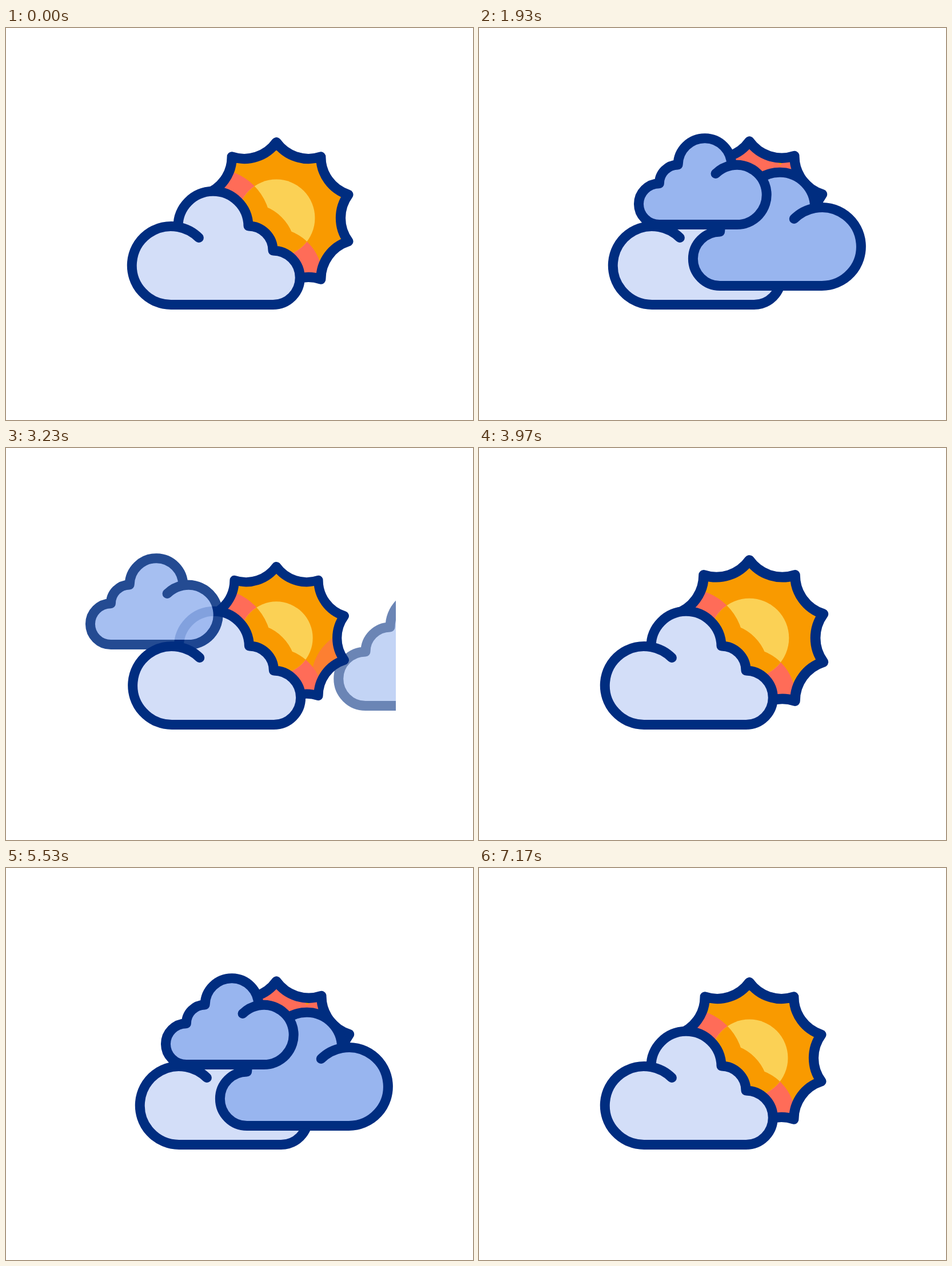
An HTML page for the animation above (7.21 s loop, 817 by 685 pixels).

```html
<!DOCTYPE html>
<html lang="en">
<head>
<meta charset="utf-8">
<title>Sun and clouds</title>
<style>
  html, body { margin: 0; width: 100%; height: 100%; overflow: hidden; background: #fff; }
  svg { display: block; width: 817px; height: 685px; }
  .line { stroke: #002d80; stroke-width: 17; stroke-linejoin: round; stroke-linecap: round; }
  .shade { stroke-width: 79; stroke-linejoin: round; stroke-linecap: round; }
  .red { fill: #ff6c58; stroke: #ff6c58; }
  .orange { fill: #f99a00; stroke: #f99a00; }
</style>
</head>
<body>
<svg viewBox="0 0 817 685">
  <defs>
    <path id="cloud" vector-effect="non-scaling-stroke" d="M289 483.5A68.5 68.5 0 1 1 301 347.6A61.5 61.5 0 0 1 424 346A43 43 0 0 1 467 389A47.25 47.25 0 0 1 467 483.5ZM301 347.6A68.5 68.5 0 0 1 337.4 366.6"/>
    <clipPath id="inStar"><path class="star sun"/></clipPath>
    <clipPath id="inDisc"><circle class="sun" r="66.5"/></clipPath>
    <clipPath id="window"><rect x="135" width="547" height="685"/></clipPath>
  </defs>
  <path class="star sun" fill="#f99a00"/>
  <g class="shade red" clip-path="url(#inStar)">
    <use href="#cloud" class="front"/><use href="#cloud" class="bigShade"/><use href="#cloud" class="small"/>
  </g>
  <circle class="sun" r="66.5" fill="#fbd155"/>
  <g class="shade orange" clip-path="url(#inDisc)">
    <use href="#cloud" class="front"/><use href="#cloud" class="bigShade"/><use href="#cloud" class="small"/>
  </g>
  <path class="star sun line" fill="none"/>
  <g class="line" clip-path="url(#window)">
    <use href="#cloud" class="front" fill="#d3def8"/>
    <use href="#cloud" class="big body"/>
    <use href="#cloud" class="small body"/>
  </g>
</svg>
<script>
const LOOP = 7210, STEP = 100 / 3, CYCLE = 108, TURN = 2 * Math.PI;

// 0 before a, 1 after b, half a cosine between
function ease(step, a, b) {
  const p = Math.min(1, Math.max(0, (step - a) / (b - a)));
  return (1 - Math.cos(Math.PI * p)) / 2;
}

// four pulses per cycle whose pace drifts a little
function sunRadius(step) {
  const t = step / 107;
  const drift = 0.22 * Math.cos(TURN * (t - 0.42)) - 0.06 * Math.sin(2 * TURN * t) - 0.065;
  return 141.5 + 10.5 * Math.cos(TURN * (4 * t + drift));
}

function setAll(selector, attrs) {
  for (const el of document.querySelectorAll(selector))
    for (const key in attrs) el.setAttribute(key, attrs[key]);
}

function starPath(points, radius, bend) {
  let d = '';
  for (let i = 0; i <= points; i++) {
    const a = i * TURN / points;
    d += (i ? `A${bend} ${bend} 0 0 0 ` : 'M') +
      `${(radius * Math.sin(a)).toFixed(2)} ${(-radius * Math.cos(a)).toFixed(2)}`;
  }
  return d + 'Z';
}

function placeCloud(name, transform, opacity) {
  setAll('.' + name, { transform, opacity });
  // a faint cloud keeps its outline but not its tint
  setAll(`.${name}.body`, { fill: opacity < 0.45 ? '#fff' : '#98b5ef' });
}

function draw(time) {
  const step = Math.min(215, Math.floor((time % LOOP + 4) / STEP)) % CYCLE;
  const go = (a, b) => ease(step, a, b);

  const front = 212 - 37 * go(12, 31) + 51 * go(31, 56) - 14 * go(58, 107);
  const big = 592 - 226 * go(23, 53) - 15 * go(57, 67) + 444 * go(87, 107);
  const small = 55 + 216 * go(24, 43.5) - 264 * go(87, 107);
  const bigAlpha = go(22, 33.5) - go(92.5, 102.5);
  const smallAlpha = go(24.5, 35.5) - go(94.5, 104.5);
  const mirrorBig = left => `translate(${left + 523} -33) scale(-1 1)`;

  setAll('.sun', { transform: `translate(473 332) scale(${sunRadius(step) / 139})` });
  placeCloud('front', `translate(${front - 212} 0)`, 1);
  placeCloud('big', mirrorBig(big), bigAlpha);
  // the shadow trails its cloud
  placeCloud('bigShade', mirrorBig(0.63 * big + 204), bigAlpha);
  placeCloud('small', `translate(${small + 399.8} -24.4) scale(-.761 .761)`, smallAlpha);
}

setAll('.star', { d: starPath(10, 130.5, 68) });
const start = performance.now();
function tick() {
  draw(performance.now() - start);
  requestAnimationFrame(tick);
}
tick();
</script>
</body>
</html>
```
